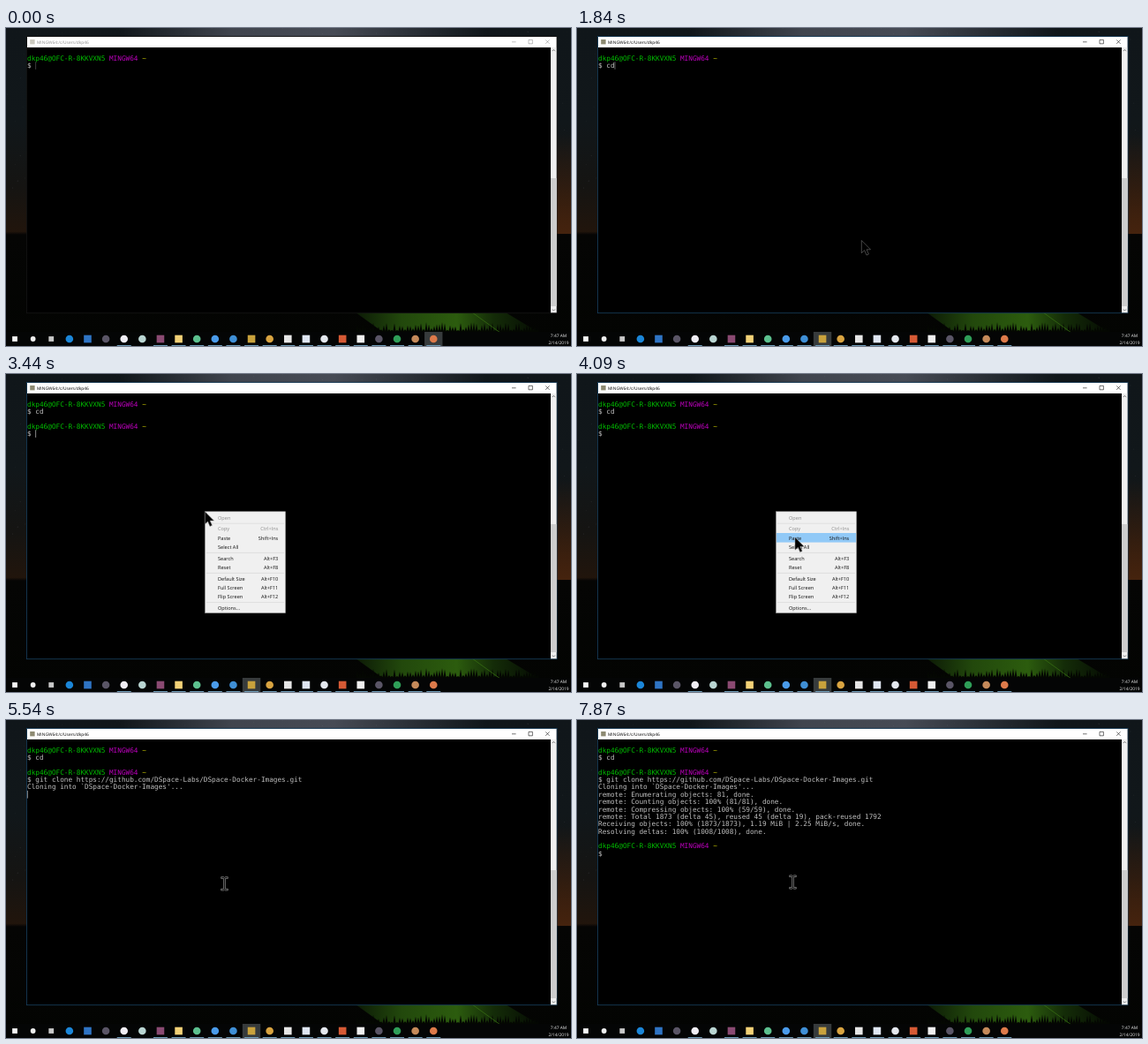
Recreate the animation shown at these times as an HTML page. Size 640 px wide and 360 px high, loop 8 s.

```html
<!DOCTYPE html>
<html lang="en">
<head>
<meta charset="utf-8">
<title>Cloning a repository</title>
<style>
  html, body { margin: 0; width: 100%; height: 100%; overflow: hidden; background: #000; }
  svg { display: block; width: 640px; height: 360px; }
  text { white-space: pre; text-rendering: geometricPrecision; }
  .term text { font: 7.736px "DejaVu Sans Mono", monospace; fill: #bfbfbf; }
  .ui { font-family: "Open Sans", "Noto Sans", sans-serif; }
  .small { font-size: 4.85px; }
  .menu text { font-size: 5.6px; fill: #111; }
  .menu .off { fill: #8d8d8d; }
  .end { text-anchor: end; }
  .mid { text-anchor: middle; }
  .user { fill: #00bf00; }
  .sys { fill: #bf00bf; }
  .dir { fill: #bfbf00; }
</style>
</head>
<body>
<svg id="stage" viewBox="0 0 640 360">
  <defs>
    <linearGradient id="sky" x2="0" y2="1">
      <stop offset="0" stop-color="#10161a"/>
      <stop offset=".3" stop-color="#11171a"/>
      <stop offset=".5" stop-color="#151412"/>
      <stop offset=".64" stop-color="#21150c"/>
      <stop offset=".65" stop-color="#050504"/>
      <stop offset="1" stop-color="#030402"/>
    </linearGradient>
    <linearGradient id="haze">
      <stop offset=".2" stop-color="#50545f" stop-opacity="0"/>
      <stop offset=".4" stop-color="#50545f" stop-opacity=".75"/>
      <stop offset=".58" stop-color="#50545f" stop-opacity=".85"/>
      <stop offset=".85" stop-color="#50545f" stop-opacity="0"/>
    </linearGradient>
    <linearGradient id="glow" x2="0" y2="1">
      <stop offset="0" stop-color="#45230e" stop-opacity="0"/>
      <stop offset="1" stop-color="#45230e"/>
    </linearGradient>
    <linearGradient id="tent">
      <stop offset="0" stop-color="#0c1a06"/>
      <stop offset=".25" stop-color="#22480c"/>
      <stop offset=".55" stop-color="#2c5c0e"/>
      <stop offset=".75" stop-color="#142c08"/>
      <stop offset="1" stop-color="#050b03"/>
    </linearGradient>
  </defs>

  <rect width="640" height="360" fill="url(#sky)"/>
  <rect width="640" height="10" fill="url(#haze)"/>
  <g id="stars" fill="#8b939b"></g>
  <rect x="624" y="120" width="16" height="113" fill="url(#glow)"/>
  <path d="M396 322H566L604 345H428Z" fill="url(#tent)"/>
  <path id="grass" fill="#040702"/>
  <path d="M528 322L560 345" stroke="#3c7414" stroke-width=".7"/>

  <g class="ui">
    <rect id="frame" x="23.5" y="9.5" width="600.5" height="313.2" fill="#000" stroke-width=".8"/>
    <rect x="24" y="10" width="599.6" height="12" fill="#fff"/>
    <g id="caption">
      <rect x="27.2" y="13" width="5.4" height="5.4" fill="#8d8a72"/>
      <text class="small" x="35" y="17.5">MINGW64:/c/Users/dkp46</text>
      <path d="M573 15.8h4.6M592 13.4h4.4v4.4h-4.4zM611.2 13.4l4.4 4.4m0-4.4l-4.4 4.4"
            fill="none" stroke="#111" stroke-width=".6"/>
    </g>
    <rect x="617" y="22" width="6.7" height="300.3" fill="#f0f0f0"/>
    <rect x="617" y="170" width="6.7" height="145" fill="#cdcdcd"/>
    <path d="M618.8 26.2l1.6-1.7 1.6 1.7M618.8 318.4l1.6 1.7 1.6-1.7" fill="none" stroke="#555" stroke-width=".7"/>
  </g>

  <g class="term" id="term"></g>
  <rect id="caret" width=".9" height="8.6" fill="#bfbfbf"/>

  <g class="ui">
    <rect y="344" width="640" height="16" fill="#050606" fill-opacity=".95"/>
    <g id="tasks"></g>
    <g class="small mid" fill="#f2f2f2">
      <text x="626" y="349.8">7:47 AM</text>
      <text x="626" y="357.8">2/14/2019</text>
    </g>
  </g>

  <g class="ui menu" id="menu">
    <rect x="225.5" y="155.8" width="91" height="114.7" fill="#f0f0f0" stroke="#a5a5a5" stroke-width=".6"/>
  </g>
  <g class="ui menu" id="pick">
    <rect x="226" y="180" width="90" height="10.6" fill="#91c9f7"/>
  </g>

  <path id="arrow" d="M0 0V14.2L3.3 11.2L5.7 16.6L8.1 15.5L5.8 10.3H10.2Z" fill="#000" stroke="#8a8a8a" stroke-width=".5"/>
  <path id="beam" d="M-3.8 -7.6H-.9L0 -6.9L.9 -7.6H3.8V-5.9H.9V5.9H3.8V7.6H.9L0 6.9L-.9 7.6H-3.8V5.9H-.9V-5.9H-3.8Z"
        fill="#000" stroke="#b4b4b4" stroke-width=".6"/>
</svg>

<script>
const LOOP = 8000, CELL = 4.657, PITCH = 8.35, LEFT = 24, TOP = 36.7;
const $ = id => document.getElementById(id);

function add(parent, tag, attrs, content) {
  const el = document.createElementNS('http://www.w3.org/2000/svg', tag);
  for (const key in attrs) el.setAttribute(key, attrs[key]);
  if (content) el.textContent = content;
  parent.appendChild(el);
  return el;
}

const show = (el, on) => el.setAttribute('visibility', on ? 'visible' : 'hidden');

// Last entry [time, ...values] whose time has come
function pick(steps, t) {
  let found = steps[0];
  for (const step of steps) if (t >= step[0]) found = step;
  return found;
}

let seed = 7;
const random = () => (seed = seed * 16807 % 2147483647) / 2147483647;
for (let i = 0; i < 420; i++) {
  const r = .2 + random() * .25;
  add($('stars'), 'circle', { cx: random() * 640, cy: random() * 190, r, opacity: .1 + random() * .35 });
}

// Dark blades in front of the tent
let blades = 'M396 345';
for (let x = 398; x < 604; x += 3) blades += `L${x} ${342 - random() * 9}L${x + 1.5} 343`;
$('grass').setAttribute('d', blades + 'V345Z');

// Taskbar: colour and shape (c = circle, s = square) of each button
const TASKS = ('s#f4f4f4 c#eeeeee s#c8c8c8 c#1b86d8 s#2f74c4 c#5a5566 c#f0eef4 c#b9d5d2 s#8a4a72 s#f2d177 c#5cc08e c#4a9bea ' +
  'c#3f8fd6 s#c9a23c c#d9a441 s#e6e6e6 s#dfe6f2 c#e4e8ee s#d65a35 s#f0f0f0 c#5a5566 c#2f9e58 c#c58a5a c#dd7a4a').split(' ');
const taskX = i => 10 + 20.62 * i;
const taskBox = fill => add($('tasks'), 'rect', { y: 344, width: 20.4, height: 16, fill });
const active = taskBox('#373b3c'), hover = taskBox('#222626');
hover.setAttribute('x', taskX(17) - 10.2);

TASKS.forEach((task, i) => {
  const x = taskX(i), fill = task.slice(1), size = i < 3 ? 2.9 : 4.3;
  if (task[0] === 'c') add($('tasks'), 'circle', { cx: x, cy: 352, r: size, fill });
  else add($('tasks'), 'rect', { x: x - size, y: 352 - size, width: 2 * size, height: 2 * size, fill });
  if (i > 5 && i !== 7) add($('tasks'), 'rect', { x: x - 8, y: 359, width: 16, height: 1, fill: '#6f9cb8' });
});

// Context menu: label, shortcut, centre line, disabled
const ITEMS = [
  ['Open', '', 163, 1], ['Copy', 'Ctrl+Ins', 175.2, 1], ['Paste', 'Shift+Ins', 185.5], ['Select All', '', 196],
  ['Search', 'Alt+F3', 208.6], ['Reset', 'Alt+F8', 219], ['Default Size', 'Alt+F10', 231.6],
  ['Full Screen', 'Alt+F11', 242], ['Flip Screen', 'Alt+F12', 252.4], ['Options...', '', 265]
];
function addItem(parent, [label, keys, y, off]) {
  const tone = off ? 'off' : '';
  add(parent, 'text', { x: 240, y: y + 2, class: tone }, label);
  add(parent, 'text', { x: 308.3, y: y + 2, class: 'end ' + tone }, keys);
}
ITEMS.forEach(item => addItem($('menu'), item));
for (const y of [169.2, 202.4, 225.4, 258.6])
  add($('menu'), 'path', { d: `M227 ${y}H315`, stroke: '#d2d2d2', 'stroke-width': .6 });
addItem($('pick'), ITEMS[2]);

// Terminal
const lines = [];
function line(row, from, text = '', to = LOOP) {
  const el = add($('term'), 'text', { x: LEFT, y: TOP + row * PITCH }, text);
  lines.push({ el, from, to });
  return el;
}
function prompt(row, from) {
  const el = line(row, from);
  add(el, 'tspan', { class: 'user' }, 'dkp46@OFC-R-8KKVXN5 ');
  add(el, 'tspan', { class: 'sys' }, 'MINGW64 ');
  add(el, 'tspan', { class: 'dir' }, '~');
  return line(row + 1, from, '$ ');
}

const firstCommand = prompt(0, 0);
const secondCommand = prompt(3, 2370);
line(5, 4480, "Cloning into `DSpace-Docker-Images'...");
line(6, 5800, 'remote: Enumerating objects: 81, done.');
line(7, 5800, 'remote: Counting objects: 100% (81/81), done.');
line(8, 5800, 'remote: Compressing objects: 100% (59/59), done.');
const receiving = line(9, 5800, '', 6630);
line(9, 6630, 'remote: Total 1873 (delta 45), reused 45 (delta 19), pack-reused 1792');
line(10, 6630, 'Receiving objects: 100% (1873/1873), 1.19 MiB | 2.25 MiB/s, done.');
line(11, 6630, 'Resolving deltas: 100% (1008/1008), done.');
prompt(13, 7480);

const CLONE = 'git clone https://github.com/DSpace-Labs/DSpace-Docker-Images.git';
const TYPED = [[0, ''], [1580, 'c'], [1710, 'cd']];
const PERCENT = [[5800, 2], [6060, 31], [6190, 55], [6320, 77], [6440, 96]];

// Caret: time, column, row, opacity
const CARET = [
  [0, 2, 1, .35], [1580, 3, 1, .55], [1710, 4, 1, .55], [2230, 0, 2, .8], [2370, 2, 4, .8], [2760, 2, 4, 0],
  [3300, 2, 4, .8], [3830, 2, 4, 0], [4220, 67, 4, .8], [4350, 0, 5, .8], [4480, 0, 6, .8], [5010, 0, 6, 0],
  [5540, 0, 6, .8], [5800, 0, 9, .8], [6060, 0, 9, 0], [6630, 0, 12, .8], [7060, 0, 12, 0],
  [7480, 2, 14, .8], [7870, 2, 14, 0]
];

// Pointer: time, shape, x, y
const POINTER = [
  [0, ''], [270, 'arrow', 392, 350], [400, 'arrow', 362, 345], [530, 'beam', 363.5, 323.5],
  [660, 'beam', 351, 294], [790, 'beam', 339, 267], [920, 'beam', 330, 250], [1050, 'beam', 326, 243],
  [1190, 'beam', 326, 242], [1580, 'arrow', 322.3, 240.5], [2900, 'beam', 298, 217], [3030, 'beam', 252, 177],
  [3160, 'beam', 226, 154.5], [3300, 'arrow', 225.3, 155.8], [3570, 'arrow', 231, 165], [3700, 'arrow', 238, 175],
  [3830, 'arrow', 244, 183], [3960, 'arrow', 247, 185], [4220, 'beam', 247.5, 185.3], [6060, 'beam', 244.5, 183.5]
];
const PICK = [[0, 0], [3830, 1], [4350, .92], [4480, .68], [4620, .3], [4750, 0]];

function draw(t) {
  const focused = t >= 1050;
  $('frame').setAttribute('stroke', focused ? '#18405f' : '#151515');
  $('caption').setAttribute('opacity', focused ? 1 : .45);
  active.setAttribute('x', taskX(t < 1190 ? 23 : 13) - 10.2);
  show(hover, t >= 400 && t < 660);

  for (const { el, from, to } of lines) show(el, t >= from && t < to);
  firstCommand.textContent = '$ ' + pick(TYPED, t)[1];
  secondCommand.textContent = '$ ' + (t >= 4220 ? CLONE : '');
  const percent = pick(PERCENT, t)[1], count = Math.ceil(1873 * percent / 100);
  receiving.textContent = `Receiving objects: ${String(percent).padStart(3)}% (${count}/1873)`;

  const [, col, row, alpha] = pick(CARET, t), caret = $('caret');
  caret.setAttribute('x', LEFT + col * CELL - .1);
  caret.setAttribute('y', TOP + row * PITCH - 6.8);
  caret.setAttribute('opacity', alpha);

  show($('menu'), t >= 3300 && t < 4220);
  $('pick').setAttribute('opacity', pick(PICK, t)[1]);

  const [, shape, x, y] = pick(POINTER, t);
  for (const id of ['arrow', 'beam']) {
    show($(id), id === shape);
    if (id === shape) $(id).setAttribute('transform', `translate(${x} ${y})`);
  }
}

const start = performance.now();
function tick() {
  draw((performance.now() - start) % LOOP);
  requestAnimationFrame(tick);
}
tick();
</script>
</body>
</html>
```
